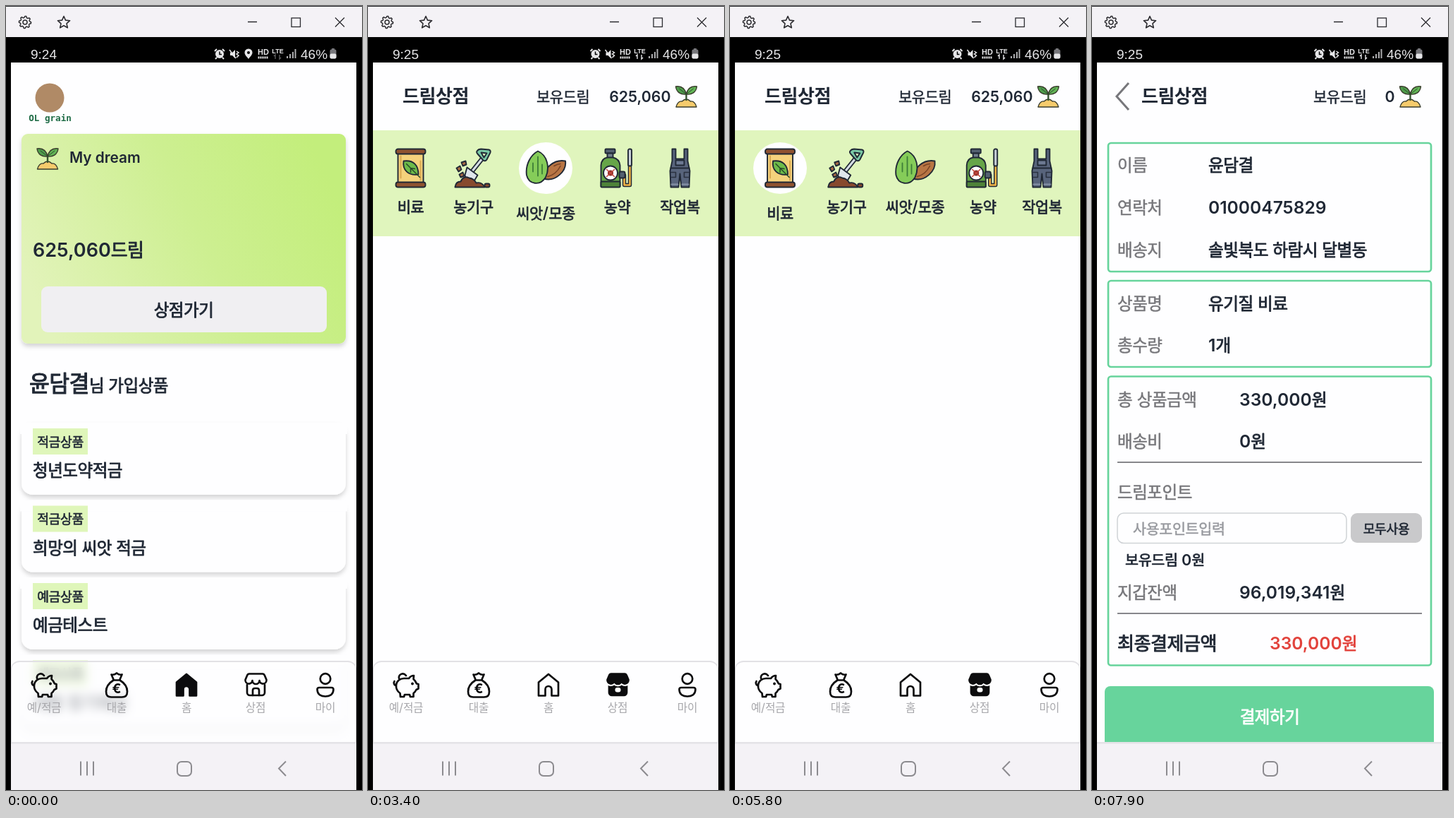
Animation of 505 by 1110 pixels, one loop 8 s. Source, as an HTML page:

```html
<!DOCTYPE html>
<html lang="ko">
<head>
<meta charset="utf-8">
<style>
  html, body { margin: 0; width: 100%; height: 100%; overflow: hidden; background: #000; }
  #stage { position: relative; width: 505px; height: 1110px; overflow: hidden; }
  svg { position: absolute; left: 0; top: 0; font-family: Inter, 'Noto Sans CJK KR', 'Noto Sans CJK', sans-serif; }
  .ko { font-size: .96em; letter-spacing: -.02em; stroke-linejoin: round; }
  /* Hangul comes in regular and bold only, so an outline gives the weights between. */
  .w500 .ko { font-weight: 400; stroke-width: .022em; }
  .w600 .ko { font-weight: 400; stroke-width: .036em; }
  .w400 .ko, .w700 .ko { stroke: none; }
  #bar {
    position: absolute; left: 7px; top: 927px; width: 490px; height: 118px; box-sizing: border-box;
    border: 2.5px solid #e2e1e5; border-width: 2.5px 1.5px 0; border-radius: 12px 12px 0 0;
    background: rgba(254, 254, 255, .65); backdrop-filter: blur(7px);
  }
</style>
</head>
<body>
<div id="stage">
  <svg id="page" width="505" height="1110"></svg>
  <div id="bar"></div>
  <svg id="chrome" width="505" height="1110"></svg>
</div>
<script>
const INK = '#202835', GREEN = '#67d49c', LOOP = 8000;

// Each step changes part of the state at its time in ms.
const steps = [
  [0, { page: 'home', nav: 'home', tab: 0, points: '0', clock: '9:24', pin: true }],
  [1100, { page: 'shop' }],
  [1200, { nav: 'shop', points: '625,060' }],
  [1700, { pin: false }],
  [2300, { tab: 1 }],
  [2900, { clock: '9:25' }],
  [3400, { tab: 2 }],
  [4400, { tab: 3 }],
  [5100, { tab: 4 }],
  [5800, { tab: 0 }],
  [6700, { page: 'detail', points: '0', price: 'NaN' }],
  [6800, { points: '625,060', price: '330,000' }],
  [7900, { page: 'pay', points: '0' }]
];

function text(x, y, str, size, { w = 600, a = 'start', c = INK, font = '' } = {}) {
  const body = str.replace(/[가-힣]+/g, `<tspan class="ko" stroke="${c}">$&</tspan>`);
  return `<text class="w${w}" x="${x}" y="${y + size * .365}" font-size="${size}" font-weight="${w}" text-anchor="${a}" fill="${c}"${font && ` font-family="${font}"`}>${body}</text>`;
}
const mid = { a: 'middle' };
const rect = (x, y, w, h, r, fill, more = '') =>
  `<rect x="${x}" y="${y}" width="${w}" height="${h}" rx="${r}" fill="${fill}" ${more}/>`;
const frame = (x, y, w, h, r, color, width) => rect(x, y, w, h, r, 'none', `stroke="${color}" stroke-width="${width}"`);
const line = (d, color, width, more = '') =>
  `<path d="${d}" fill="none" stroke="${color}" stroke-width="${width}" ${more}/>`;
const shape = (d, fill, more = '') => `<path d="${d}" fill="${fill}" ${more}/>`;
const at = (x, y, body, more = '') => `<g transform="translate(${x} ${y})" ${more}>${body}</g>`;
const round = 'stroke-linecap="round" stroke-linejoin="round"';

const defs = `<defs>
  <linearGradient id="lime" x1="0" y1=".65" x2="1" y2=".35">
    <stop offset="0" stop-color="#e2f3ba"/><stop offset=".55" stop-color="#cdef91"/><stop offset="1" stop-color="#c3ee7b"/>
  </linearGradient>
  <filter id="soft" x="-10%" y="-10%" width="120%" height="130%">
    <feDropShadow dx="0" dy="4" stdDeviation="3" flood-color="#000" flood-opacity=".17"/>
  </filter></defs>`;

const sprout = (x, y) => at(x, y,
  shape('M1.500 31Q4 22 10 23Q16 17 22 23Q28 22 30.500 31Z', '#f6cb6c') +
  line('M16 21V11', '#35542f', 2.4) +
  shape('M16 13C14 4 8 1 1 2C2 10 8 14 16 13Z', '#4f9d4b') +
  shape('M16 13C18 4 24 1 31 2C30 10 24 14 16 13Z', '#62b455') +
  line('M6 5L16 13L26 5', '#2c4a2d', 1),
  `stroke="#3a3d2d" stroke-width="1.400" ${round}`);

// Category pictures, each in a 56 px box.
const pictures = [
  rect(10, 5, 36, 46, 0, '#f5d27c') + rect(7, 1, 42, 7, 3, '#8f5230') + rect(7, 48, 42, 7, 3, '#8f5230') +
  line('M14 11V42M42 18V45', '#d9a851', 2) +
  shape('M18 18C32 16 39 24 39 37C25 39 16 31 18 18Z', '#6dbb4a') + line('M22 22L41 41M28 28V34M28 28L34 29', '#294a2a', 1.5),

  line('M25 34L41 14', INK, 6.5) + line('M25 34L41 14', '#d5dde4', 3) +
  shape('M33 4Q35 1 39 1L50 2Q53 3 52 6L47 16Q45 19 42 17L34 8Q32 6 33 4Z', '#79c8a5') + shape('M39 6L47 7L43 13Z', '#e0f5bd') +
  shape('M19 27L34 38L28 48Q17 47 16 38Z', '#dfe6ec') +
  shape('M2 55Q3 47 10 47Q14 38 22 42Q29 43 32 49Q40 47 44 55Z', '#87492d') +
  shape('M4 28L9 25L11 30L7 33ZM11 20L17 18L18 23L13 25ZM8 37L13 34L15 39L10 41Z', '#a86a43') +
  rect(44, 50, 7, 5, 2, '#87492d'),

  shape('M56 18C58 32 42 48 25 43C25 28 40 15 56 18Z', '#b87544') + line('M31 40Q43 37 49 25M40 25Q45 22 49 22', '#7a4426', 1.6) +
  shape('M17 4C31 10 34 28 28 41C20 54 4 51 1 38C-1 23 7 9 17 4Z', '#85cc59') +
  line('M17 12V39M10 21V33M23 23V36', '#3d7d38', 1.8),

  line('M34 38H38V52H46V24', INK, 5.5) + line('M34 38H38V52H46V24', '#f0b246', 2.6) +
  rect(43.5, 1, 5, 24, 2, '#c9d0d8') +
  rect(11, 1, 14, 6, 1, '#536070') + rect(14, 7, 8, 7, 0, '#72808d') +
  shape('M5 54V24Q6 14 14 13H22Q31 15 32 24V54Z', '#66a548') + rect(5, 47, 27, 8, 1, '#4f8339') +
  rect(31, 33, 8, 9, 2, '#536070') + `<circle cx="18.500" cy="35" r="10" fill="#fff"/>` +
  `<circle cx="18.500" cy="35" r="4" fill="#8c302b" stroke="none"/>` + line('M13 30L24 40M24 30L13 40', '#c5463b', 1.6),

  shape('M17 1H22V15H34V1H39V18L42 32L41 55H30L28 36L26 55H15L14 32L17 18Z', '#58647c') +
  shape('M22 17H34V24H22Z', '#6d7a93') + line('M15 28H41', INK, 2) +
  line('M15 34H22V41H15M41 34H34V41H41', '#2b3240', 1.6) + line('M16 51H25M31 51H40', '#8793a8', 2)
];
const tabNames = ['비료', '농기구', '씨앗/모종', '농약', '작업복'];
const tabWidths = [55, 57, 82, 55, 57];

function tabs(selected) {
  const widths = tabWidths.map((w, i) => i === selected ? Math.max(w, 76) : w);
  const gap = (438 - widths.reduce((a, b) => a + b)) / 4;
  let x = 33;
  return widths.map((w, i) => {
    const cx = x + w / 2, on = i === selected;
    x += w + gap;
    return (on ? `<ellipse cx="${cx}" cy="229.500" rx="38" ry="36.500" fill="#fefeff"/>` : '') +
      at(cx - 28, 201.5, pictures[i], `stroke="${INK}" stroke-width="1.900" ${round}`) +
      text(cx, on ? 293 : 284.5, tabNames[i], 21.8, mid);
  }).join('');
}

const header = (s, x) =>
  text(x, 127, '드림상점', 27.2, { w: 700 }) +
  text(s.points === '0' ? 314 : 239, 128.5, '보유드림', 21.8, { w: 500 }) +
  text(429.5, 128.5, s.points, 21.3, { a: 'end' }) + sprout(435.5, 112);

const back = line('M52 109L35 128L52 147', '#77777b', 3);

const pages = {
  home() {
    const items = ['적금상품/청년도약적금', '적금상품/희망의 씨앗 적금', '예금상품/예금테스트', '예금상품/새봄 정기예금'];
    return `<circle cx="62" cy="130" r="20.500" fill="#b08a66"/>` +
      text(62.5, 158, 'OL grain', 12.6, { w: 700, a: 'middle', c: '#1d6b45', font: "'DejaVu Sans Mono', monospace" }) +
      rect(22, 181, 460, 297, 9, 'url(#lime)', 'filter="url(#soft)"') +
      sprout(43, 200) + text(90, 214, 'My dream', 20.8) +
      text(38, 345.5, '625,060드림', 27) +
      rect(50, 397, 405, 65, 9, '#f0eff2') + text(252, 430, '상점가기', 24.5, mid) +
      text(33, 534, '윤담결', 32.7) + text(118, 537, '님 가입상품', 24.5) +
      items.map((item, i) => {
        const [tag, name] = item.split('/'), y = 598 + i * 109.5;
        return rect(22, y - 8, 460, 102, 16, '#fefeff', 'filter="url(#soft)"') + rect(20, y - 8, 464, 16, 0, '#fefeff') +
          rect(38, y, 78, 37, 0, '#dff6ba') + text(77, y + 19, tag, 19, mid) + text(38, y + 59.5, name, 24.5);
      }).join('');
  },
  shop: s => header(s, 49) + rect(7, 176, 490, 150, 0, '#e0f5bd') + tabs(s.tab),
  detail: s => back + header(s, 70) +
    frame(81, 177, 342, 381.5, 0, '#cbcbce', 1.2) +
    line('M32 600L44 596L56 600L61 606L56 608V617L44 620L32 617V608L27 606ZM32 600L44 603L56 600M44 596V620M32 608L41 610L44 603L47 610L56 608', '#77777b', 1.7) +
    text(77, 607, 'QV두빛통운', 21.8) +
    frame(191, 592, 69, 27, 13.5, INK, 1.5) + text(225.5, 606, '무료배송', 16.4, { w: 500, a: 'middle' }) +
    line('M33 638H55M34 642H54L57 649H31ZM34 649V660M54 649V660M34 659H46V649', '#77777b', 2) +
    text(77, 648.5, '판매자 :', 21.8) +
    frame(23, 686, 221, 53, 5, '#111', 2.7) + frame(260, 686, 221, 53, 5, '#111', 2.7) +
    line('M37 713H48M219 713H234M226.500 705V721', INK, 2.8) + text(132.5, 713, '1', 31, mid) +
    text(410, 713.5, s.price, 25.8, { a: 'end' }) + text(467.5, 713.5, '드림', 27, { a: 'end' }) +
    rect(21, 757, 462, 64, 8, GREEN) + text(252, 790, '구매하기', 24.5, { a: 'middle', c: '#fff' }) +
    text(22, 858.5, '상품상세', 24.5) + frame(23, 894, 458, 190, 4, '#c8c8cb', 2.6) +
    text(252, 927, '이 제품은 판매처의 상품으로', 21.6, mid) +
    text(252, 962, '상품 정보는 변동될 수 있습니다', 21.6, mid),
  pay(s) {
    const grey = { w: 500, c: '#77777b' };
    const row = (y, label, value, x = 165) => text(36, y, label, 24.5, grey) + text(x, y, value, 24.6);
    const box = (y, h) => frame(23, y, 458, h, 4, GREEN, 2.7);
    return back + header(s, 70) + box(194, 182) + box(389, 122) + box(524.5, 409) +
      row(225.5, '이름', '윤담결') + row(285.5, '연락처', '01000475829') + row(345.5, '배송지', '솔빛북도 하람시 달별동') +
      row(421, '상품명', '유기질 비료') + row(480.5, '총수량', '1개') +
      row(557, '총 상품금액', '330,000원', 209) + row(616.5, '배송비', '0원', 209) +
      line('M36 646H468M36 860H468', '#87878b', 2) +
      text(36, 688, '드림포인트', 24.5, grey) +
      frame(36, 718, 325, 42.5, 9, '#cfd3d6', 1.5) + text(58, 740, '사용포인트입력', 21.6, { w: 500, c: '#97999e' }) +
      rect(367, 718, 101, 42, 9, '#c9c9cb') + text(417.5, 740, '모두사용', 19, mid) +
      text(47, 784, '보유드림 0원', 21.6) + row(830.5, '지갑잔액', '96,019,341원', 209) +
      text(36, 902.5, '최종결제금액', 27.2) + text(252, 902.5, '330,000원', 24.6, { c: '#e2433c' }) +
      rect(18, 963, 467, 90, 8, GREEN) + text(252, 1006.5, '결제하기', 24.5, { a: 'middle', c: '#fff' });
  }
};

function bottomNav(active) {
  const B = '#0c0c0e', fill = name => active === name ? B : 'none';
  const shop = active === 'shop';
  const awning = 'M7 1.500H26Q28 1.500 29 4L31.500 10A5 5 0 0 1 21.500 11A5 5 0 0 1 11.500 11A5 5 0 0 1 1.500 10L4 4Q5 1.500 7 1.500Z';
  const icons = [
    at(36, 944, line('M22 8C24 5 27 4 29 4L28.500 9C31 11 32 13 33 15.500L35.500 16V22.500L32.500 24C31 27 30 28 28.500 29V34H24L23 31H16L15 34H10L9.500 29C5 26 3.500 22 4 17C5 11 10 8 15 8ZM4 18C1 18 0 14 1.500 12M8 8C7 2 14 -1 18 4', B, 2.7) +
      `<circle cx="27" cy="15.500" r="1.900" fill="${B}" stroke="none"/>`),
    at(140.5, 943.5, line('M12 11C4 16 1.500 21 1.500 27C1.500 33 4 35 9 35H24C29 35 31.500 33 31.500 27C31.500 21 29 16 21 11ZM12 10L9 3Q13 4 16.500 1Q20 4 24 3L21 10', B, 2.7) +
      text(16.5, 23, '€', 19, { w: 700, a: 'middle', c: B })),
    at(240, 944.5, shape('M2 13L16 1.500L30 13V32H20.500V23A4.500 4.500 0 0 0 11.500 23V32H2Z', fill('home'), `stroke="${B}" stroke-width="2.700"`)),
    at(338, 944, shape('M4 17V28A4 4 0 0 0 8 32H25A4 4 0 0 0 29 28V17', fill('shop'), `stroke="${B}" stroke-width="2.700"`) +
      (shop ? line(awning, '#fefeff', 7) + rect(12.5, 21, 8, 6.5, 3, '#fff') : line('M12 32V25Q12 22 15 22H18Q21 22 21 25V32', B, 2.7)) +
      shape(awning, fill('shop'), `stroke="${B}" stroke-width="2.700"`)),
    at(440.5, 944, `<circle cx="12.500" cy="8.500" r="7.300" fill="none" stroke="${B}" stroke-width="2.700"/>` +
      line('M1 23.500Q1 21 4 21H21Q24 21 24 23.500C24 31 18 33.500 12.500 33.500S1 31 1 23.500Z', B, 2.7))
  ];
  const labels = ['예/적금', '대출', '홈', '상점', '마이'], xs = [54, 157, 256, 354, 453];
  return `<g ${round}>${icons.join('')}</g>` +
    labels.map((label, i) => text(xs[i], 993.5, label, 16.4, { w: 400, a: 'middle', c: '#a7a7ab' })).join('');
}

function statusBar(s) {
  const C = '#e6e6e8', font = "'Liberation Sans', sans-serif", small = { w: 700, a: 'middle', c: C, font };
  const shift = s.pin ? 0 : 19.5;
  return text(35, 68, s.clock, 19, { w: 400, c: C, font }) +
    at(303 + shift, 68, `<circle r="6" fill="${C}"/>` + line('M-7 -4L-4 -7M7 -4L4 -7M-4 5L-6 7M4 5L6 7', C, 2) + line('M0 -3.500V0.500H3', '#000', 1.5)) +
    at(324 + shift, 68, shape('M-6 -2H-3L1 -6V6L-3 2H-6Z', C) + line('M-7 -6L2 6M3 -4L6 -2L3 0L6 2L3 5', C, 1.5)) +
    (s.pin ? at(344, 68, shape('M0 7C-3 3 -5.500 1 -5.500 -2A5.500 5.500 0 0 1 5.500 -2C5.500 1 3 3 0 7Z', C) + '<circle cy="-2" r="2" fill="#000"/>') : '') +
    text(365, 65, 'HD', 11, small) + line('M357.500 73H372.500', C, 3, 'stroke-dasharray="2 1"') +
    text(385.5, 64, 'LTE', 9, small) +
    line('M382 75V69L380 71M388 69V75L390 73', C, 1.4, `opacity="${s.pin ? .4 : 1}"`) +
    line('M399 74V71M403 74V68M407 74V65M410.500 74V61', C, 2, 'opacity=".75"') +
    text(418, 68, '46%', 19, { w: 400, c: C, font }) +
    rect(459.5, 61.5, 9, 13, 2, '#77777b') + rect(462, 60, 4, 2, 0, '#77777b') + rect(459.5, 67.5, 9, 7, 2, C);
}

function windowBar() {
  const D = '#2c2c30';
  const ring = (count, radius) => 'M' + Array.from({ length: count }, (_, i) => {
    const a = i * 2 * Math.PI / count;
    return [radius(i) * Math.sin(a), -radius(i) * Math.cos(a)].map(v => v.toFixed(1));
  }).join('L') + 'Z';
  const star = ring(10, i => i % 2 ? 4.2 : 9);
  const gear = ring(32, i => i % 4 < 2 ? 8.6 : 6.6);
  return rect(0, 0, 505, 44, 0, '#f4f2f6') + rect(0, 0, 505, 1, 0, '#2c2c30') +
    at(27, 23, line(gear, D, 1.5, round) + `<circle r="3" fill="none" stroke="${D}" stroke-width="1.500"/>`) +
    at(82, 23.5, line(star, D, 1.6, round)) +
    line('M343 22.500H356M467 16.500L480 29.500M480 16.500L467 29.500', D, 1.3) + frame(405, 17, 12.5, 12.5, 0, D, 1.3);
}

const systemNav = () => rect(7, 1043, 490, 67, 0, '#f4f2f6') + rect(7, 1042, 490, 2.5, 0, '#e4e3e7') +
  line('M106 1069.500V1089.500M115 1069.500V1089.500M124 1069.500V1089.500', '#8c8b8f', 2) +
  frame(243, 1070, 20, 20, 6, '#8c8b8f', 2) + line('M397 1069.500L387 1079.500L397 1090', '#8c8b8f', 2);

const $ = id => document.getElementById(id);

function draw(s) {
  const bar = s.page !== 'pay';
  $('page').innerHTML = defs + rect(7, 80, 490, 1030, 0, '#fefeff') + pages[s.page](s);
  $('bar').style.display = bar ? 'block' : 'none';
  $('chrome').innerHTML = windowBar() + rect(0, 44, 505, 36, 0, '#000') + statusBar(s) +
    (bar ? bottomNav(s.nav) : '') + systemNav();
}

let shown = -1;
const start = performance.now();
function tick(now) {
  const t = Math.max(0, now - start) % LOOP;
  const count = steps.filter(([time]) => time <= t).length;
  if (count !== shown) {
    shown = count;
    draw(Object.assign({}, ...steps.slice(0, count).map(([, change]) => change)));
  }
  requestAnimationFrame(tick);
}
tick(start);
</script>
</body>
</html>
```
